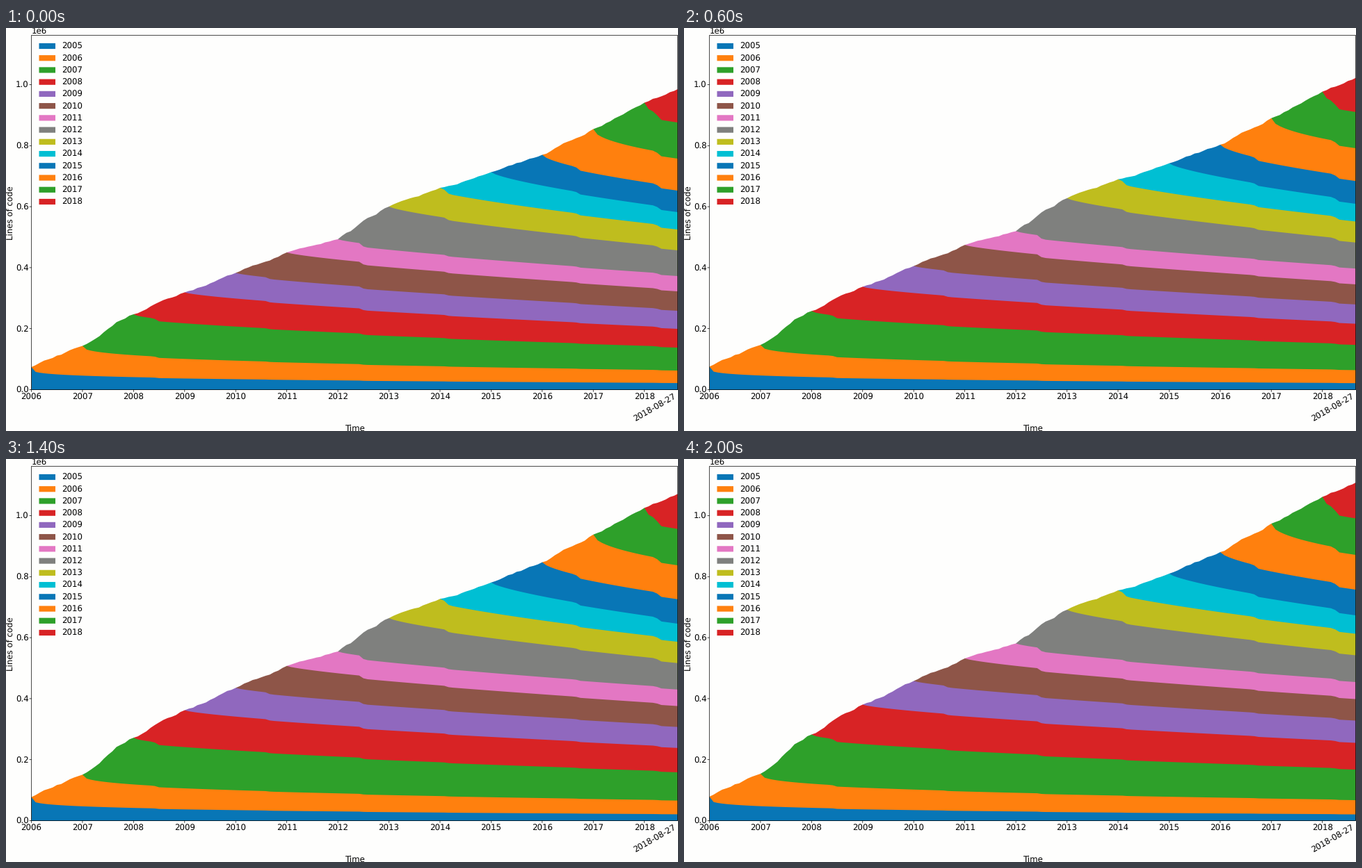
Recreate the animation shown at these times as a matplotlib script. Size 966 by 580 pixels, loop 2200 ms.

```python
import numpy as np
import matplotlib.pyplot as plt
from matplotlib.animation import FuncAnimation
from matplotlib.patches import Polygon, Rectangle

W, H, DPI = 966, 580, 64
PT = 72 / DPI                      # points per pixel
FONT = 11.7 * PT
LEFT, RIGHT, TOP, BASE = 36.5, 965.5, 10.5, 521
YEAR_W, TICK_H = 73.43, 87.8
FRAMES, INTERVAL = 11, 200

plt.rcParams["path.snap"] = False
plt.rcParams["text.hinting"] = "none"

CYCLE = ["#0876b6", "#ff800e", "#2ea02a", "#d82325", "#9068be",
         "#8e5548", "#e377c3", "#7f807e", "#bfbd1e", "#00bfd3"]

# Key points of each cohort's upper edge: its peak, its right end, its climb in a loop.
PEAK = [488, 457.5, 412, 380.5, 352.5, 323, 304, 257, 230, 207.5, 182.5, 145.5, 107.5, 88]
LAST = [511, 493, 460, 433, 407, 379, 357, 320, 290, 265, 234, 188, 136, 88]
CLIMB = [2, 4.5, 15.5, 27, 33, 36, 38.5, 40, 41, 42.5, 48.5, 52.5, 53, 54]
SETTLE = 2.5                       # climb lost by the time an edge reaches the right

# Clean-ups that remove old code quickly: start in years since 2006, extra years of decay.
CLEANUPS = [(2.4, 0.5), (4.58, 0.3), (6.42, 0.6), (8.08, 0.3), (10.65, 0.25), (12.22, 0.5)]

COUNT = len(PEAK)
END = (RIGHT - LEFT) / YEAR_W
MONTHS = np.append(np.arange(int(END * 12) + 1) / 12, END)

rng = np.random.default_rng(7)
pace = rng.uniform(0.5, 1.5, len(MONTHS) - 1) * np.diff(MONTHS)
WORK = np.append(0, np.cumsum(pace))
DECAY = MONTHS + sum(size * np.clip((MONTHS - t) / 0.1, 0, 1) for t, size in CLEANUPS)


def share(clock):
    return (clock - clock[0]) / max(clock[-1] - clock[0], 1e-9)


def fade_power(i):
    """The oldest and the newest cohorts lose their code soonest."""
    def near(d):
        return np.exp(-d * d / 3.3)
    return 0.76 - 0.53 * near(i) - 0.33 * near(COUNT - 2 - i)


def outline(i, u):
    top = PEAK[i] - u * CLIMB[i]
    peak_at = min(i, END)
    old = MONTHS >= peak_at
    fall = share(DECAY[old]) ** fade_power(i)
    x = MONTHS[old]
    y = top + fall * (LAST[i] - PEAK[i] + u * SETTLE)
    if i:
        new = (MONTHS >= i - 1) & (MONTHS <= peak_at)
        start = PEAK[i - 1] - u * CLIMB[i - 1]
        x = np.append(MONTHS[new], x)
        y = np.append(start + share(WORK[new]) * (top - start), y)
    x = LEFT + YEAR_W * x
    return [*zip(x, y), (RIGHT, BASE), (x[0], BASE)]


fig = plt.figure(figsize=(W / DPI, H / DPI), dpi=DPI, facecolor="#fefefd")
ax = fig.add_axes([0, 0, 1, 1])
ax.set_xlim(0, W)
ax.set_ylim(H, 0)
ax.axis("off")


def label(x, y, text, ha="center", va="baseline", rotation=0):
    ax.text(x, y, text, ha=ha, va=va, rotation=rotation, fontsize=FONT,
            family="DejaVu Sans", color="black", zorder=30)


def line(xs, ys):
    ax.plot(xs, ys, color="black", lw=0.7 * PT, zorder=25)


# Each area runs down to the axis and the older ones cover the newer ones.
areas = []
for i in range(COUNT):
    area = Polygon(outline(i, 0), closed=True, lw=0,
                   facecolor=CYCLE[i % 10], zorder=20 - i)
    areas.append(ax.add_patch(area))

ax.add_patch(Rectangle((LEFT, TOP), RIGHT - LEFT, BASE - 0.5 - TOP, fill=False,
                       edgecolor="black", lw=0.7 * PT, zorder=25))

for n in range(COUNT - 1):
    x = LEFT + YEAR_W * n
    line([x, x], [BASE, BASE + 2.5])
    label(x, 534.6, str(2006 + n))
for n in range(6):
    y = BASE - 0.5 - TICK_H * n
    line([LEFT - 2.5, LEFT], [y, y])
    label(32.5, y + 4.8, f"{n / 5:.1f}", ha="right")

label(LEFT, 9, "1e6", ha="left")
label(501.8, 580, "Time")
label(6.5, 266, "Lines of code", va="center", rotation=90)
label(932.5, 547, "2018-08-27", va="center", rotation=30)

for i in range(COUNT):
    y = 26 + 17.23 * i
    ax.add_patch(Rectangle((47.5, y - 4.1), 23.5, 8.2, lw=0,
                           facecolor=CYCLE[i % 10], zorder=26))
    label(80.6, y + 4.2, str(2005 + i), ha="left")


def update(k):
    for i, area in enumerate(areas):
        area.set_xy(outline(i, k / (FRAMES - 1)))
    return areas


anim = FuncAnimation(fig, update, frames=FRAMES, interval=INTERVAL,
                     repeat=True, repeat_delay=0, blit=False)
plt.show()
```
